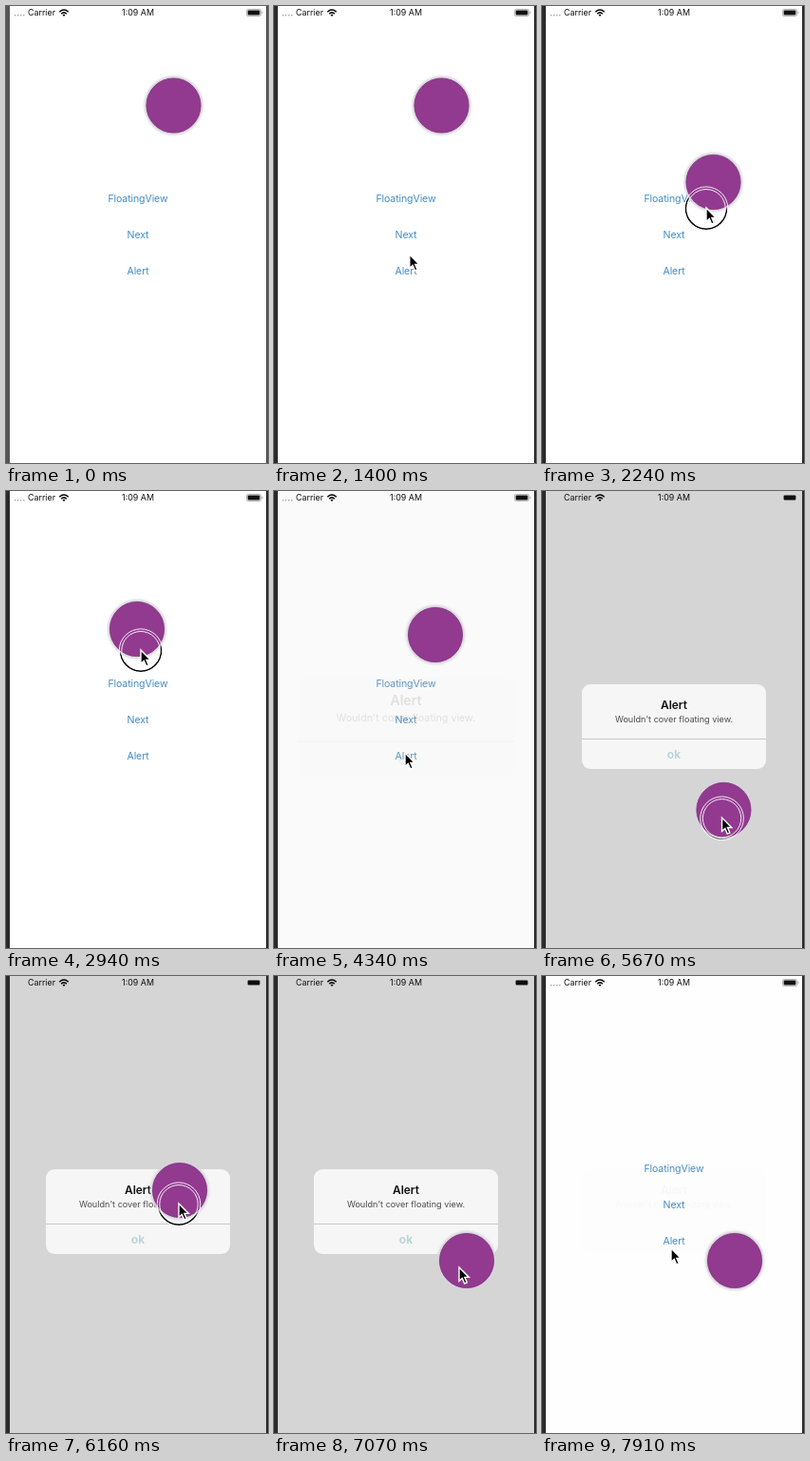
Write an HTML page that moves like this. It is 276 by 480 pixels and loops after 8000 ms.

```html
<!DOCTYPE html>
<html lang="en">
<head>
<meta charset="utf-8">
<title>Floating view</title>
<style>
  html, body { margin: 0; width: 100%; height: 100%; overflow: hidden; background: #fff; }
  svg { display: block; width: 276px; height: 480px; font-family: Inter, Roboto, sans-serif; }
  .status { font-size: 8.9px; fill: #111; }
  .mid { text-anchor: middle; }
  #links { font-size: 10.6px; letter-spacing: -.12px; }
</style>
</head>
<body>
<svg viewBox="0 0 276 480">
  <defs>
    <filter id="blur" x="-20%" y="-20%" width="140%" height="140%"><feGaussianBlur stdDeviation="1"/></filter>
  </defs>
  <rect width="276" height="480" fill="#fff"/>

  <g id="links" class="mid">
    <text id="floating" x="139" y="206">FloatingView</text>
    <text x="139" y="244">Next</text>
    <text x="139" y="282">Alert</text>
  </g>

  <g class="status">
    <path id="dots" d="M9.5 9.7H19" stroke="#999" stroke-width="1.6" stroke-linecap="round" stroke-dasharray="0 3.1"/>
    <text x="23" y="10.2">Carrier</text>
    <g fill="none" stroke="#000" stroke-width="1.5">
      <path d="M56.3 6.2Q61 1.8 65.7 6.2M58.2 8.2Q61 5.6 63.8 8.2"/>
      <path d="M61 10.9l-1.5-1.6q1.5-1.2 3 0z" fill="#000" stroke="none"/>
    </g>
    <text class="mid" x="139" y="10.2">1:09 AM</text>
    <g id="case" fill="none" stroke="#999" stroke-width=".8">
      <rect x="253.4" y="3.4" width="15.2" height="7.2" rx="2"/>
      <path d="M270 5.8v2.4"/>
    </g>
    <rect x="254.6" y="4.5" width="12.8" height="5" rx="1"/>
  </g>

  <rect id="dim" width="276" height="480" fill="#000"/>
  <g id="alert" class="mid" fill="#111">
    <rect x="42" y="203" width="194" height="89" rx="9" fill="#f6f6f6"/>
    <path d="M42 260.5H236" stroke="#c8c8c8"/>
    <text x="139" y="228.5" font-size="12" font-weight="600">Alert</text>
    <text id="message" x="139" y="243" font-size="9.1">Wouldn't cover floating view.</text>
    <text id="ok" x="139" y="281" font-size="12.2">ok</text>
  </g>

  <circle id="ring" r="21.5" cy=".7" fill="none" stroke="#000" stroke-width="1.7"/>
  <g id="ball">
    <circle r="31" fill="#d8d2dc" filter="url(#blur)"/>
    <circle r="28.6" fill="#923a90" stroke="#7c3379" stroke-width=".8"/>
  </g>
  <g id="cursor">
    <g id="rim" fill="none" stroke="#fff" stroke-width=".9">
      <circle r="22.8" cy=".7"/><circle r="20.2" cy=".7"/>
    </g>
    <path d="M0 0V14.4L3.3 11.4L5.7 17L8.3 15.9L5.9 10.4H10.3Z" stroke="#fff" stroke-width="1.4"/>
  </g>

  <path id="frame" d="M0 0H4V480H0ZM274 0H276V480H274Z"/>
</svg>
<script>
const LOOP = 8000;
const el = id => document.getElementById(id);
const ramp = (t, a, b) => Math.min(1, Math.max(0, (t - a) / (b - a)));
const smooth = p => p * p * (3 - 2 * p);
const easeOut = p => 1 - (1 - p) ** 2;
const show = (id, opacity) => el(id).setAttribute('opacity', opacity);
const move = (id, [x, y]) => el(id).setAttribute('transform', `translate(${x} ${y})`);

// A glide eases to a point; its swing bends the way sideways and downwards.
const glide = (start, end, to, swing = [0, 0]) => ({ start, end, to, swing });

function place(from, glides, t) {
  let at = from;
  for (const { start, end, to, swing } of glides) {
    if (t < start) break;
    const p = smooth(ramp(t, start, end));
    const bend = [Math.sin(2 * Math.PI * p), Math.sin(Math.PI * p)];
    at = at.map((v, d) => v + (to[d] - v) * p + swing[d] * bend[d]);
  }
  return at;
}

// Each drag carries the pointer and, loosely, the ball.
const drags = [
  { pointer: glide(1740, 2240, [173, 212]), ball: [180.5, 185] },
  { pointer: glide(2240, 2940, [142, 167], [25, 75]), ball: [138, 145] },
  { pointer: glide(2940, 3220, [167, 177]), ball: [170, 151] },
  { pointer: glide(5110, 6160, [182, 239], [-45, 145]), ball: [183, 225] },
  { pointer: glide(6160, 6790, [195, 306], [-25, 0]), ball: [203, 299] }
];
const ballGlides = drags.map(({ pointer, ball }) => ({ ...pointer, to: ball }));
const pointerGlides = [
  glide(490, 570, [141, 340]),
  glide(740, 910, [149, 286]),
  glide(1020, 1120, [138, 281]),
  glide(1330, 1640, [174, 131]),
  glide(3340, 3780, [138, 275], [0, 70]),
  glide(4400, 4950, [167, 152]),
  glide(7100, 7400, [136, 286]),
  ...drags.map(d => d.pointer)
].sort((a, b) => a.start - b.start);

const press = (t, a, b) => ramp(t, a, a + 120) * (1 - ramp(t, b, b + 80));

function draw(t) {
  const pointer = place([137, 398], pointerGlides, t);
  const pressed = press(t, 1680, 3120) + press(t, 4040, 4240) + press(t, 4990, 6780) + press(t, 7460, 7600);
  move('cursor', pointer);
  move('ring', pointer);
  move('ball', place([176.5, 104.5], ballGlides, t));
  show('cursor', +(t >= 490));
  show('ring', pressed);
  show('rim', pressed);
  el('frame').setAttribute('fill', t < 1330 ? '#555' : '#2b2b2b');

  const enter = easeOut(ramp(t, 4320, 4700));
  const shown = enter * (1 - easeOut(ramp(t, 7650, 7960)));
  const faded = shown * ramp(t, 5110, 5300);
  show('dim', shown * .165);
  show('alert', shown);
  el('alert').setAttribute('transform',
    `translate(139 247.5) scale(${1.2 - .2 * enter}) translate(-139 -247.5)`);
  el('links').style.fill = `color-mix(in srgb, #a0a0a0 ${shown * 100}%, #468cc3)`;

  show('dots', 1 - shown * .7 - faded * .3);
  show('case', 1 - shown);
  show('floating', 1 - faded);
  show('message', 1 - faded * .25);
  el('ok').style.fill = `color-mix(in srgb, #b4d2d8 ${faded * 100}%, #7890a8)`;
  el('ok').style.fontWeight = faded > .5 ? 600 : 400;
}

const start = performance.now();
function tick() {
  draw((performance.now() - start) % LOOP);
  requestAnimationFrame(tick);
}
tick();
</script>
</body>
</html>
```
